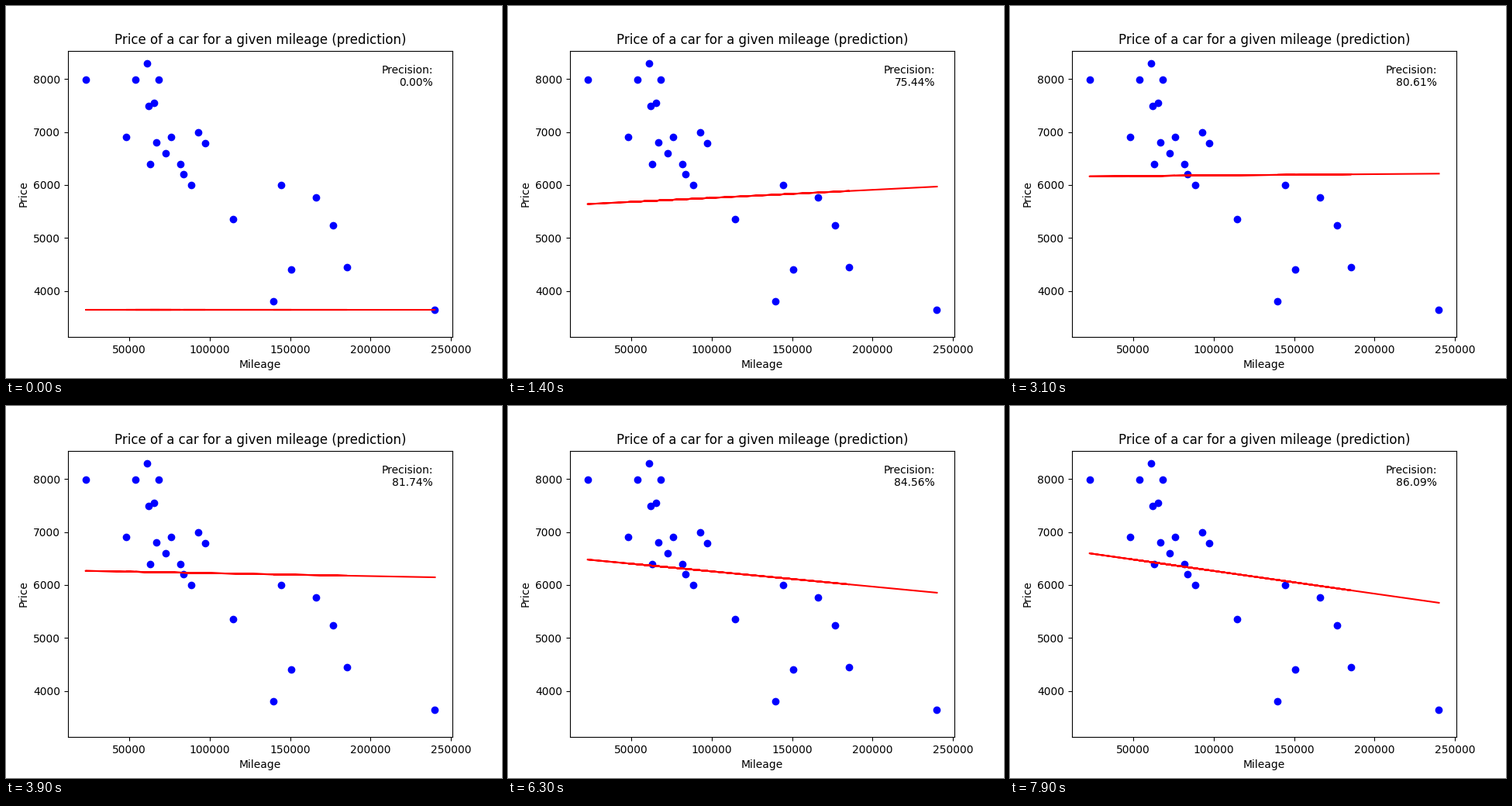
A matplotlib script that plays this animation: 640 by 480 pixels, repeating every 8000 ms.

```python
import numpy as np
import matplotlib.pyplot as plt
from matplotlib.animation import FuncAnimation

FRAMES = 80
EPOCHS = 1000
RATE = 0.1

# Means over the normalized listings: normal matrix, right side, squared price.
H = np.array([[1, 0.3600502], [0.3600502, 0.1860504]])
B = np.array([0.5779813, 0.1514862])
YY = 0.4115801


def arch(left, right, base, peak):
    """Three cars on a parabola."""
    t = np.linspace(-1, 1, 3)
    return np.c_[(left + right) / 2 + t * (right - left) / 2,
                 peak - (peak - base) * t ** 2]


def decline():
    """Cars that lose value faster and faster."""
    t = np.linspace(0, 1, 4) ** 0.58
    return np.c_[144500 + 41000 * t, 6000 - 1550 * t ** 3]


def pairs():
    """Two short falling pairs, the second one higher."""
    i = np.arange(4)
    return np.c_[84000 + 4500 * i, 6200 - 200 * (i % 2) + 790 * (i // 2)]


def descend():
    """Return the thetas and the cost for every epoch of gradient descent."""
    theta = np.zeros(2)
    thetas, costs = [], []
    for _ in range(EPOCHS + 1):
        thetas.append(theta)
        costs.append(YY + theta @ H @ theta - 2 * B @ theta)
        theta = theta - RATE * (H @ theta - B)
    return thetas, costs


def padded(v, margin=0.05):
    pad = margin * np.ptp(v)
    return v.min() - pad, v.max() + pad


lone = [(240000, 3650), (139800, 3800), (150500, 4400), (114800, 5350),
        (22899, 7990), (65674, 7555), (67000, 6800)]
km, price = np.vstack([
    lone, decline(), pairs(),
    arch(48235, 76025, 6900, 7490),
    arch(63060, 82029, 6390, 6600),
    arch(54000, 68500, 7990, 8290),
]).T

x = (km - km.min()) / np.ptp(km)
thetas, costs = descend()


def predict(epoch):
    t0, t1 = thetas[epoch]
    return price.min() + np.ptp(price) * (t0 + t1 * x)


fig, ax = plt.subplots(figsize=(6.4, 4.8), dpi=100)
ax.set_title("Price of a car for a given mileage (prediction)")
ax.set_xlabel("Mileage")
ax.set_ylabel("Price")
ax.plot(km, price, "bo")
line, = ax.plot(km, predict(0), "r-")
label = ax.text(0.95, 0.95, "", transform=ax.transAxes, ha="right", va="top")

# The view holds both the data and the fully trained line.
ax.set_xlim(padded(km))
ax.set_ylim(padded(np.concatenate([price, predict(EPOCHS)])))


def update(epoch):
    line.set_ydata(predict(epoch))
    precision = 100 * (1 - costs[epoch] / costs[0])
    label.set_text(f"Precision:\n{precision:.2f}%")
    return line, label


anim = FuncAnimation(fig, update, frames=FRAMES, interval=100, repeat=True)
plt.show()
```
